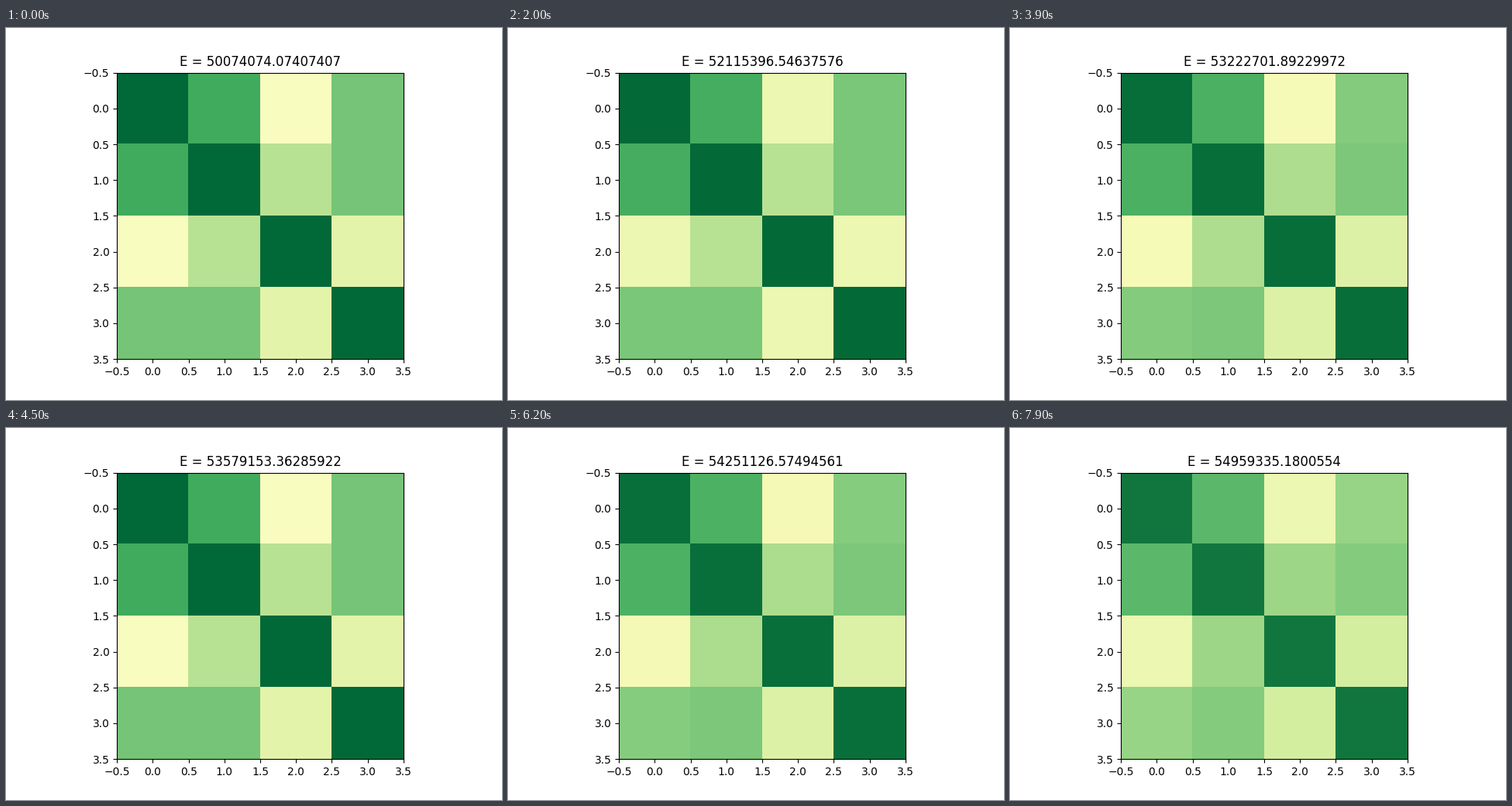
Write a matplotlib script that moves like this. It is 640 px wide and 480 px high and loops after 8000 ms.

```python
import numpy as np
import matplotlib.pyplot as plt
from matplotlib.animation import FuncAnimation

FRAMES, STEP = 80, 100
CELLS = np.triu_indices(4, 1)

# Each pose: the diagonal level, then the upper triangle row by row
CALM = [.868, .624, .106, .507, .340, .507, .209]
TILT = [.866, .615, .170, .495, .343, .495, .170]
SOFT = [.812, .565, .170, .423, .411, .471, .263]

KEYS = [
    (0, 50074074.07407407, CALM),
    (20, 52115396.54637576, TILT),
    (31, 52747433.26488706, SOFT),
    (45, 53579153.36285922, CALM),
    (55, 54001868.57676737, CALM),
    (69, 54500384.573123835, SOFT),
    (79, 54959335.1800554, SOFT),
]
TIMES, ENERGIES, POSES = zip(*KEYS)


def matrix(step):
    diagonal, *pairs = [np.interp(step, TIMES, level) for level in zip(*POSES)]
    upper = np.zeros((4, 4))
    upper[CELLS] = pairs
    return upper + upper.T + diagonal * np.eye(4)


plt.rcParams["text.kerning_factor"] = 6  # plain glyph spacing
fig, ax = plt.subplots(figsize=(6.4, 4.8), dpi=100)
image = ax.imshow(matrix(0), cmap="YlGn", vmin=0, vmax=1)
title = ax.set_title("")


def update(step):
    image.set_data(matrix(step))
    title.set_text(f"E = {float(np.interp(step, TIMES, ENERGIES))}")
    return image, title


anim = FuncAnimation(fig, update, frames=FRAMES, interval=STEP,
                     repeat=True, repeat_delay=0)
plt.show()
```
